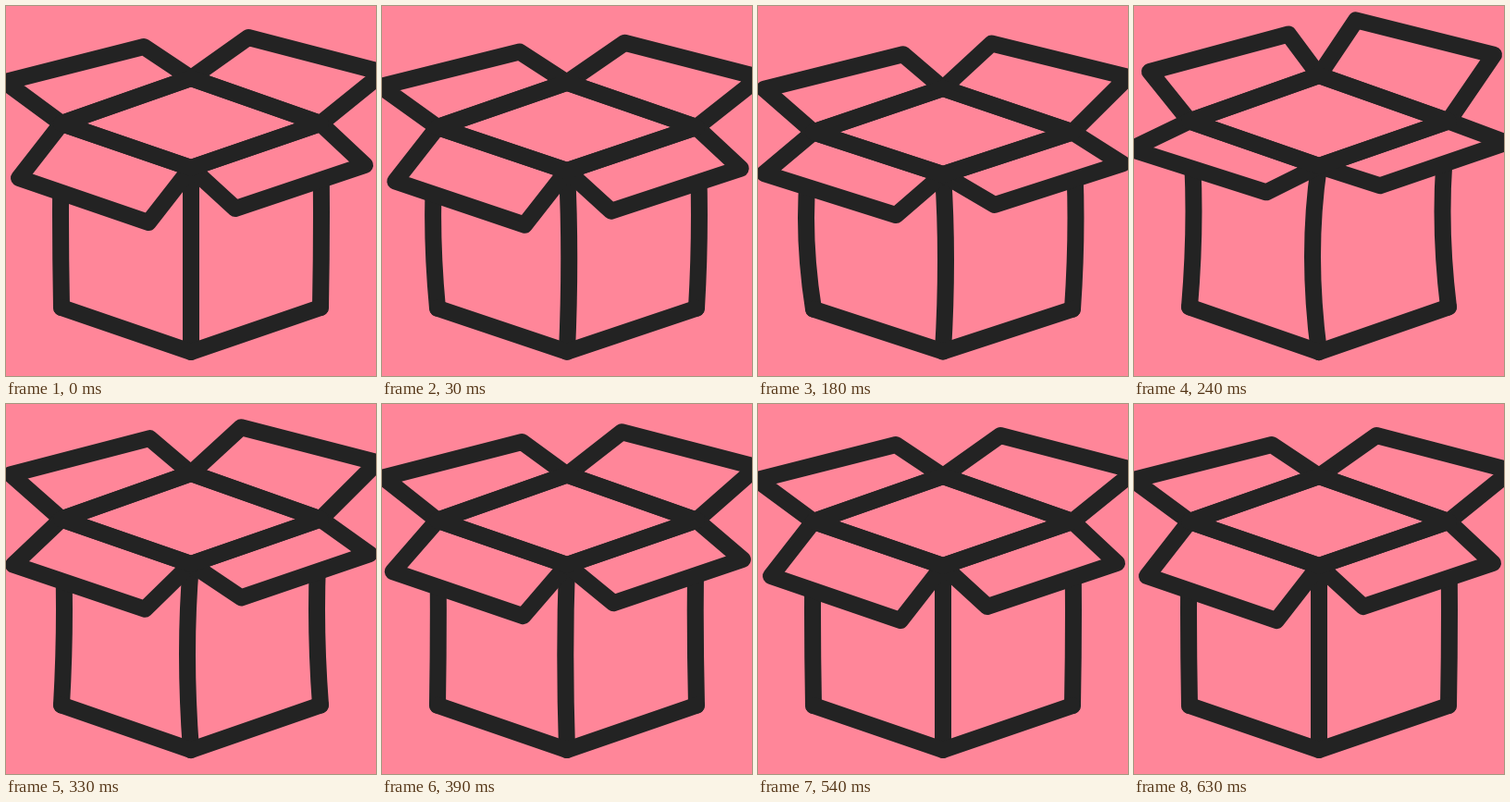
Animation, 400 px wide and 400 px high, one loop 690 ms. Source, as an HTML page with a canvas:

```html
<!DOCTYPE html>
<html lang="en">
<head>
<meta charset="utf-8">
<title>Bouncing box</title>
<style>
html, body { margin: 0; width: 100%; height: 100%; overflow: hidden; background: #ff8699; }
canvas { display: block; width: 400px; height: 400px; }
</style>
</head>
<body>
<canvas id="stage" width="400" height="400"></canvas>
<script>
const ctx = document.getElementById('stage').getContext('2d');
const PINK = '#ff8699', INK = '#232323';
const LOOP = 690, STEP = 30, LAST = 630;

// Key times in ms and the value of each track at them.
const TIMES = [0, 90, 180, 240, 330, 450, 540, 690];
const TRACKS = {
  drop:  [0, 20, 11, -3, -3, 0, 0, 0],
  open:  [0, 0, 0.43, 1, 0.35, 0.03, 0, 0],
  left:  [-1, -17, -8, 4.5, 3, -1, -1, -1],
  mid:   [0, 9, 3, -7, -4, 0, 0, 0],
  right: [1, 9, 3.5, -6.5, -4, 1, 1, 1]
};

function slopeAt(v, i) {
  if (i === 0 || i === TIMES.length - 1) return 0;
  const before = TIMES[i] - TIMES[i - 1], after = TIMES[i + 1] - TIMES[i];
  const s0 = (v[i] - v[i - 1]) / before, s1 = (v[i + 1] - v[i]) / after;
  return (s0 * after + s1 * before) / (before + after);
}

// Smooth cubic through the keys.
function sample(v, t) {
  let i = 0;
  while (i < TIMES.length - 2 && t >= TIMES[i + 1]) i++;
  const h = TIMES[i + 1] - TIMES[i], u = (t - TIMES[i]) / h, w = 1 - u;
  return v[i] * (1 + 2 * u) * w * w + slopeAt(v, i) * h * u * w * w
    + v[i + 1] * u * u * (3 - 2 * u) - slopeAt(v, i + 1) * h * u * u * w;
}

function poly(points, fill) {
  ctx.beginPath();
  points.forEach(p => ctx.lineTo(...p));
  ctx.closePath();
  if (fill) ctx.fill();
  ctx.stroke();
}

function bentEdge([x0, y0], [x1, y1], bulge) {
  ctx.beginPath();
  ctx.moveTo(x0, y0);
  ctx.quadraticCurveTo((x0 + x1) / 2 + 2 * bulge, y0 + (y1 - y0) * 0.47, x1, y1);
  ctx.stroke();
}

function draw(t) {
  const { drop, open, left, mid, right } = Object.fromEntries(
    Object.entries(TRACKS).map(([name, v]) => [name, sample(v, t)]));
  const squash = 1 - 0.0035 * drop;

  const back = [200, 78 + drop], front = [200, 175 + 0.65 * drop];
  const rimY = 127 + 0.85 * drop, baseY = 326 + 0.16 * drop;
  const west = [60, rimY], east = [340, rimY];
  const baseWest = [60, baseY], base = [200, 374 - 0.04 * drop], baseEast = [340, baseY];

  // Flap corner: rest offset from its hinge plus the change when fully open.
  const tip = (hinge, x, y, dx, dy) =>
    [hinge[0] + x + dx * open, hinge[1] + (y + dy * open) * squash];

  ctx.fillStyle = PINK;
  ctx.fillRect(0, 0, 400, 400);
  ctx.strokeStyle = INK;
  ctx.lineWidth = 18;
  ctx.lineJoin = ctx.lineCap = 'round';

  bentEdge(west, baseWest, left);
  bentEdge(east, baseEast, right);
  bentEdge(front, base, mid);
  ctx.beginPath();
  [baseWest, base, baseEast].forEach(p => ctx.lineTo(...p));
  ctx.stroke();

  poly([west, tip(west, -61, -45, 18, -8), tip(back, -51, -34, 18, -10), back]);
  poly([back, tip(back, 62, -44, -22, -15), tip(east, 68, -55, -19, -16), east]);
  poly([west, tip(west, -46, 59, -17, -29), tip(front, -46, 59, -11, -31), front], true);
  poly([front, tip(front, 48, 44, 18, -23), tip(east, 48, 45, 14, -22), east], true);
  poly([back, east, front, west]);
}

function tick(now) {
  const t = Math.floor((now % LOOP) / STEP) * STEP;
  draw(Math.min(t, LAST));
  requestAnimationFrame(tick);
}
draw(0);
requestAnimationFrame(tick);
</script>
</body>
</html>
```
